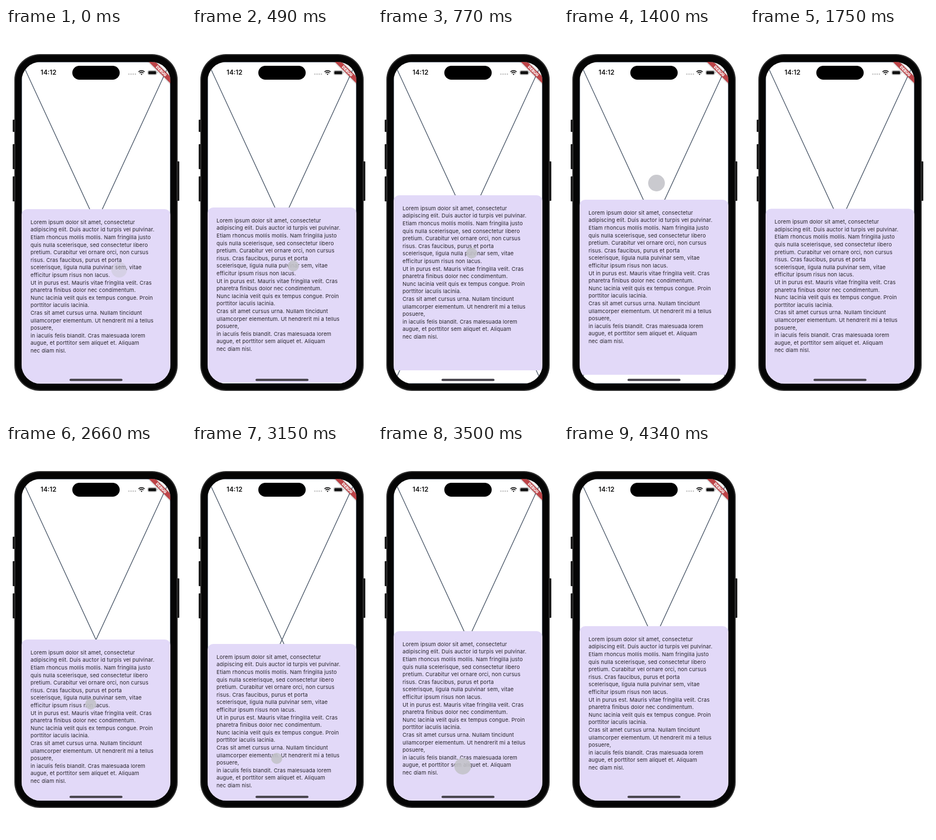
Animation, 323 px wide and 700 px high, one loop 4.6 s. Source, as an HTML page:

```html
<!DOCTYPE html>
<html lang="en">
<head>
<meta charset="utf-8">
<title>Bouncing sheet</title>
<style>
  html, body { margin: 0; width: 100%; height: 100%; overflow: hidden; background: #fff; }
  svg { display: block; width: 323px; height: 700px; }
  text { font-family: Inter, "Liberation Sans", sans-serif; }
  .copy text { font-size: 9.52px; letter-spacing: .16px; fill: #252229; }
  .clock { font-size: 11.6px; font-weight: 600; fill: #111; }
  .banner { font-size: 6.9px; font-weight: 900; fill: #fff; text-anchor: middle; }
</style>
</head>
<body>
<svg viewBox="0 0 323 700">
  <defs>
    <clipPath id="screen"><rect x="28" y="61" width="267" height="579" rx="34"/></clipPath>
    <filter id="soft" x="-30%" y="-100%" width="160%" height="300%"><feGaussianBlur stdDeviation="1.8"/></filter>
  </defs>

  <!-- phone body -->
  <g fill="#1b1b1b">
    <rect x="12" y="165" width="5" height="22" rx="1"/>
    <rect x="12" y="209" width="5" height="45" rx="1"/>
    <rect x="12" y="267" width="5" height="45" rx="1"/>
    <rect x="306" y="240" width="5" height="71" rx="1"/>
  </g>
  <rect x="15" y="47" width="293" height="606" rx="46" fill="#2a2a2a"/>
  <rect x="17" y="49" width="289" height="602" rx="44.5" fill="#050505"/>

  <g clip-path="url(#screen)">
    <rect x="28" y="61" width="267" height="579" fill="#fff"/>
    <path d="M28 61H295V640H28ZL295 640M295 61L28 640" fill="none" stroke="#4c596a" stroke-width="1.36"/>

    <g id="sheet">
      <path d="M28 315V10a10 10 0 0 1 10-10H285a10 10 0 0 1 10 10V315Z" fill="#e2d9f8"/>
      <g class="copy" id="copy"></g>
    </g>

    <circle id="touch" fill="#c3c3c9"/>

    <g transform="translate(295 61) rotate(45)">
      <rect x="-34" y="19" width="68" height="8.2" fill="#000" opacity=".5" filter="url(#soft)"/>
      <rect x="-34" y="19" width="68" height="8.2" fill="#bd4347"/>
      <text class="banner" y="25.6">DEBUG</text>
    </g>

    <text class="clock" x="62" y="84.3">14:12</text>
    <rect x="119" y="68" width="85" height="25" rx="12.5" fill="#000"/>
    <g fill="#bbb">
      <circle cx="220.5" cy="83" r="1.2"/><circle cx="224.4" cy="83" r="1.2"/>
      <circle cx="228.3" cy="83" r="1.2"/><circle cx="232.2" cy="83" r="1.2"/>
    </g>
    <g fill="none" stroke="#111" stroke-width="1.7">
      <path d="M237.8 78.9a7.6 7.6 0 0 1 10.8 0M239.8 81.1a4.8 4.8 0 0 1 6.8 0"/>
      <path d="M243.2 84.4l-1.2-1.3a1.8 1.8 0 0 1 2.4 0z" fill="#111" stroke-width=".6"/>
    </g>
    <rect x="254.4" y="76.4" width="16" height="7.8" rx="2.4" fill="#fff" stroke="#999" stroke-width=".7"/>
    <rect x="255.4" y="77.4" width="14" height="5.8" rx="1.5" fill="#111"/>
    <path d="M271.4 79v2.6q1-.4 1-1.3t-1-1.3z" fill="#999"/>

    <rect x="114" y="631.3" width="95" height="4" rx="2" fill="#444149"/>
  </g>
</svg>

<script>
const LOOP = 4600, STEP = 70;
const $ = id => document.getElementById(id);

const lines = `Lorem ipsum dolor sit amet, consectetur
adipiscing elit. Duis auctor id turpis vel pulvinar.
Etiam rhoncus mollis mollis. Nam fringilla justo
quis nulla scelerisque, sed consectetur libero
pretium. Curabitur vel ornare orci, non cursus
risus. Cras faucibus, purus et porta
scelerisque, ligula nulla pulvinar sem, vitae
efficitur ipsum risus non lacus.
Ut in purus est. Mauris vitae fringilla velit. Cras
pharetra finibus dolor nec condimentum.
Nunc lacinia velit quis ex tempus congue. Proin
porttitor iaculis lacinia.
Cras sit amet cursus urna. Nullam tincidunt
ullamcorper elementum. Ut hendrerit mi a tellus
posuere,
in iaculis felis blandit. Cras malesuada lorem
augue, et porttitor sem aliquet et. Aliquam
nec diam nisl.`.split("\n");

lines.forEach((line, i) => {
  const el = document.createElementNS("http://www.w3.org/2000/svg", "text");
  el.setAttribute("x", 44);
  el.setAttribute("y", 26.8 + i * 13.6);
  el.textContent = line;
  $("copy").append(el);
});

// Linear interpolation through [time, value] points.
function track(points, t) {
  const i = points.findIndex(p => p[0] > t);
  if (i < 0) return points[points.length - 1][1];
  if (i === 0) return points[0][1];
  const [t0, a] = points[i - 1], [t1, b] = points[i];
  return a + (b - a) * (t - t0) / (t1 - t0);
}

const REST = 326, PULL = 32;
const pull = [
  [0, 0], [420, 0], [490, -3], [560, -8.5], [770, -25], [910, -29], [1120, -31.5], [1260, -PULL],
  [2240, 0], [2310, 2], [2450, 12], [2590, 21], [2800, 30], [3150, PULL], [3290, PULL]
];
const rebound = [[0, 1], [70, .79], [140, .53], [210, .28], [280, .15], [350, .07], [490, .02], [560, 0]];

function sheetTop(t) {
  if (t >= 3290) return REST + PULL * track(rebound, t - 3290);
  if (t >= 1260 && t < 2240) return REST - PULL * track(rebound, t - 1260);
  return REST + track(pull, t);
}

const drags = [
  { start: 0, release: 1260,
    x: [[0, 203], [280, 196], [560, 177], [770, 168], [1260, 166]],
    y: [[0, 435], [420, 432], [560, 424], [770, 405], [910, 378], [1120, 310], [1260, 279]] },
  { start: 2100, release: 3290,
    x: [[2100, 152]],
    y: [[2240, 351], [2310, 353], [2450, 385], [2800, 520], [3150, 564], [3290, 578]] }
];
const pressSize = [[0, 14], [70, 11.5], [140, 10]];
const pressFade = [[0, .4], [70, .88]];
const liftSize = [[0, 10], [70, 13.5], [140, 15]];
const liftFade = [[0, .88], [210, .88], [420, 0]];

function drawTouch(t) {
  const drag = drags.findLast(d => t >= d.start);
  const held = t - drag.start, lifted = t - drag.release;
  const up = lifted >= 0;
  const set = (name, value) => $("touch").setAttribute(name, value);
  set("cx", track(drag.x, t));
  set("cy", track(drag.y, t));
  set("r", up ? track(liftSize, lifted) : track(pressSize, held));
  set("opacity", up ? track(liftFade, lifted) : track(pressFade, held));
}

function draw(now) {
  const t = Math.min(Math.floor((now % LOOP) / STEP) * STEP, 4340);
  $("sheet").setAttribute("transform", `translate(0 ${sheetTop(t)})`);
  drawTouch(t);
}

let begin;
function tick(now) {
  begin ??= now;
  draw(now - begin);
  requestAnimationFrame(tick);
}
draw(0);
requestAnimationFrame(tick);
</script>
</body>
</html>
```
